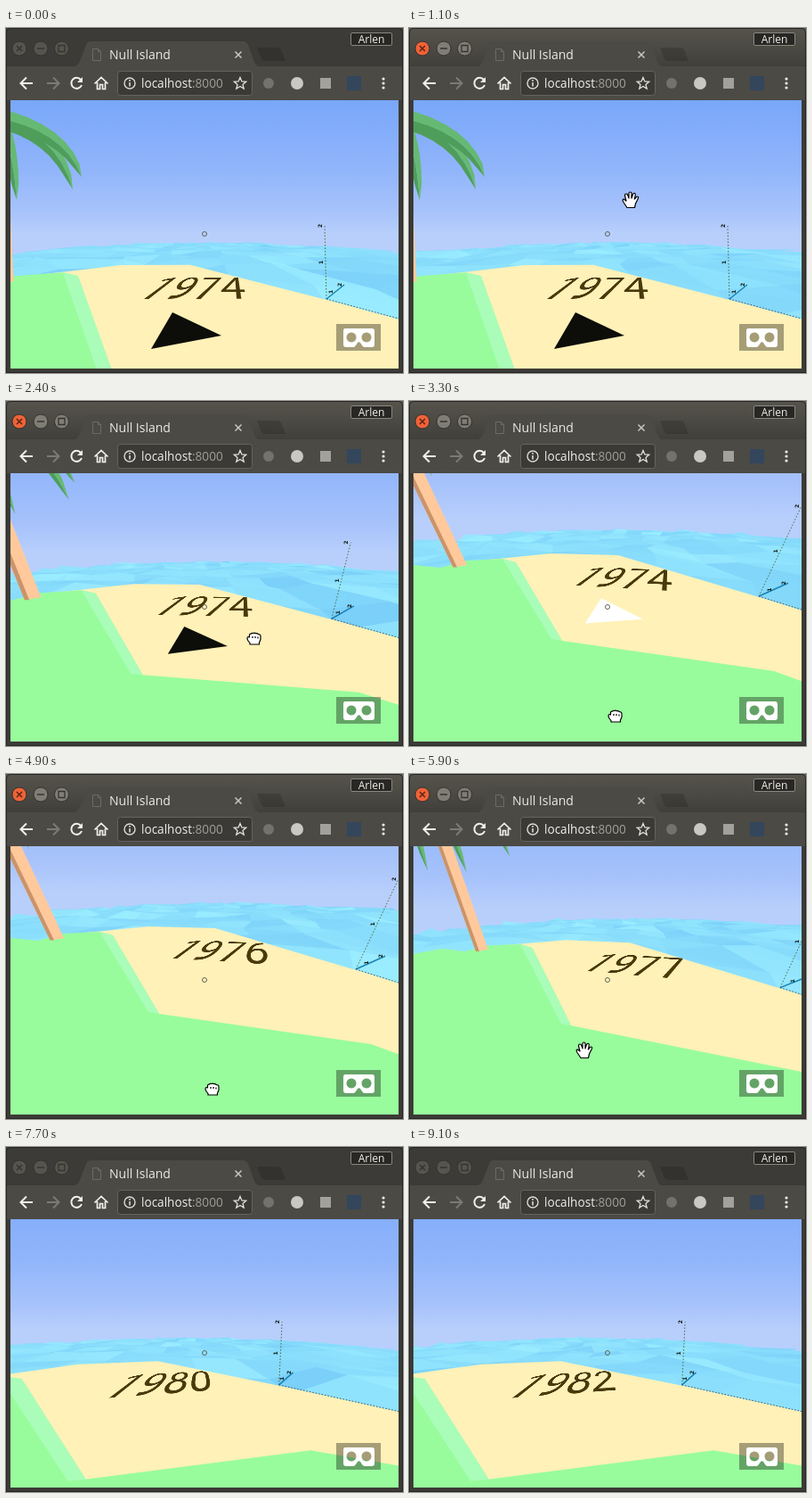
An HTML page with a canvas that plays this animation: 446 by 387 pixels, repeating every 9200 ms.

```html
<!DOCTYPE html>
<html lang="en">
<head>
<meta charset="utf-8">
<title>Null Island</title>
<style>
html, body { margin: 0; width: 100%; height: 100%; overflow: hidden; background: #2b2a27; }
#win { position: relative; width: 446px; height: 387px; overflow: hidden; background: #3c3b37; font-family: "Open Sans", "Noto Sans", sans-serif; }
#bar { position: absolute; inset: 0 0 auto; height: 44px; background: #3c3b37; }
.on #bar { background: linear-gradient(#56544c, #403f3a); }
#chrome, #hand { position: absolute; left: 0; top: 0; }
#chrome text { font-size: 14px; }
.btn { fill: #56544e; stroke: #34332f; }
.glyph { fill: none; stroke: #35342f; }
.on .btn { fill: #807d75; }
.on .close { fill: #ee6238; }
.on .close + .glyph { stroke: #5f2410; }
#scene { position: absolute; left: 5px; top: 81px; width: 436px; height: 301px; overflow: hidden; }
canvas { display: block; }
#year { position: absolute; left: 0; top: 0; font: 400 100px/1 Roboto, sans-serif; color: #4a390b; transform-origin: 0 0; white-space: nowrap; }
#ring { position: absolute; left: 215px; top: 147px; width: 4px; height: 4px; border: 1px solid #62645c; border-radius: 50%; }
#vr { position: absolute; left: 366px; top: 251px; width: 50px; height: 30px; background: rgba(0, 0, 0, .35); }
#frame { position: absolute; inset: 0; border: 1px solid #262522; border-radius: 5px 5px 0 0; }
</style>
</head>
<body>
<div id="win">
  <div id="bar"></div>
  <svg id="chrome" width="446" height="387">
    <circle class="btn close" cx="15" cy="23" r="8"/>
    <path class="glyph" stroke-width="1.5" d="M12 20l6 6m0-6l-6 6"/>
    <circle class="btn" cx="39" cy="23" r="8"/>
    <path class="glyph" stroke-width="1.5" d="M35 23h8"/>
    <circle class="btn" cx="62.5" cy="23" r="8"/>
    <path class="glyph" stroke-width="1.3" d="M59 19.5h7v7h-7z"/>
    <rect y="43" width="446" height="38" fill="#4b4a45"/>
    <path d="M76 44Q81 42 83 37L90 19Q91 15 96 15H266Q270 15 272 19L279 38Q281 43 286 44Z" fill="#4b4a45"/>
    <path d="M282 22H305Q308 22 309 24L314 37H291Q288 37 287 35Z" fill="#000" fill-opacity=".14"/>
    <path d="M97.5 23.5h6l3 3v10h-9zM103.5 23.5v3h3" fill="none" stroke="#6d6b65"/>
    <text x="116" y="35" fill="#ecebe6">Null Island</text>
    <path d="M257.5 26.5l7 7m0-7l-7 7" stroke="#c9c7c1" stroke-width="1.5"/>
    <rect x="387.5" y="5.5" width="46" height="14" rx="1.5" fill="#282724" stroke="#8a8881"/>
    <text x="410.5" y="17" text-anchor="middle" fill="#eeede8" style="font-size:12px">Arlen</text>
    <g fill="none" stroke="#f1f0ec" stroke-width="2">
      <path d="M30 62H17m6-6.5L16.5 62l6.5 6.5"/>
      <path d="M46 62h13m-6-6.5l6.5 6.5-6.5 6.5" stroke="#7c7a74"/>
      <path d="M84 58a6 6 0 1 0 1 6"/><path d="M86 55v6h-6z" fill="#f1f0ec" stroke="none"/>
      <path d="M99.5 62.5L107 55.5l7.5 7M102.500 61v7.5h3v-5h3v5h3V61" stroke-width="1.7"/>
    </g>
    <rect x="125.5" y="48.5" width="151" height="27" rx="3" fill="#3b3a36" stroke="#65635d"/>
    <circle cx="139" cy="62" r="6" fill="none" stroke="#dddbd6" stroke-width="1.4"/>
    <path d="M139 58v1.7M139 61v4.5" stroke="#dddbd6" stroke-width="1.6"/>
    <text x="152" y="67" fill="#f1f0ec" style="font-size:13.6px">localhost<tspan fill="#a19f98">:8000</tspan></text>
    <path d="M263 55.5l1.9 4.4 4.8.4-3.7 3.1 1.2 4.7-4.2-2.6-4.2 2.6 1.2-4.7-3.7-3.1 4.8-.4z" fill="none" stroke="#e3e1dc" stroke-width="1.3"/>
    <circle cx="295" cy="62" r="6" fill="#74726c"/>
    <circle cx="327" cy="62" r="7" fill="#c9c8c4"/>
    <rect x="353" y="56" width="12" height="12" fill="#a3a19c"/>
    <rect x="383" y="54" width="16" height="16" fill="#33465c"/>
    <g fill="#f1f0ec"><circle cx="424" cy="57" r="1.6"/><circle cx="424" cy="62" r="1.6"/><circle cx="424" cy="67" r="1.6"/></g>
  </svg>
  <div id="scene">
    <canvas width="436" height="301"></canvas>
    <div id="year">1974</div>
    <div id="ring"></div>
    <svg id="vr" viewBox="0 0 50 30">
      <path fill="#fff" fill-rule="evenodd" d="M10 5H40Q43 5 43 8V23Q43 26 40 26H32Q30 26 29 24L27 21Q25.500 19.500 24 21L22 24Q21 26 19 26H11Q8 26 8 23V8Q8 5 10 5ZM17 9.500a5.500 5.500 0 1 0 .01 0ZM34 9.500a5.500 5.500 0 1 0 .01 0Z"/>
    </svg>
  </div>
  <div id="frame"></div>
  <svg id="hand" width="20" height="20" fill="#fff" stroke="#000" stroke-width="1.2" stroke-linejoin="round">
    <path id="open" d="M6 18.5L2 12.5Q0 9 2.5 9L5 11 3.5 5Q3.5 3 5 3 6.5 3 7 5L8 8V2.5Q8 1 9.5 1 11 1 11 2.5V8L12.5 3.5Q13 2 14.3 2.3 15.6 2.7 15.3 4.3L14.3 9 16.5 6.5Q17.7 5.5 18.5 6.5 19 7.2 18 9L15.5 14 14.5 18.5Z"/>
    <path id="closed" d="M5 16V14.5L3 12Q1 8 3 7.5L4.5 8V5.5Q4.5 4 6.3 4.2 7.2 3 8.7 3.5 10.2 2.6 11.6 3.7 13.3 3.2 14.3 4.6 17 4.5 17 7V10.5L15.5 14V16ZM8 7v2m3-2v2m3-1.5v2"/>
  </svg>
</div>
<script>
const $ = id => document.getElementById(id);
const ctx = document.querySelector('canvas').getContext('2d');
const LOOP = 9200, CX = 223, CY = 231.5, F = 150.5 / Math.tan(Math.PI * 2 / 9);
const mix = (a, b, u) => a.map((n, i) => n + (b[i] - n) * u);
const ease = (t, from, to) => {
  const u = Math.max(0, Math.min(1, (t - from) / (to - from)));
  return u * u * (3 - 2 * u);
};

// Each drag turns the camera by GAIN radians per pixel; between drags the hand glides to the next grip.
const GAIN = .002, GLIDE = 200, HOME = [241, 200];
const DRAGS = [
  { t: [1200, 1800], from: [257, 186], to: [230, 346] },
  { t: [2300, 3000], from: [282, 262], to: [232, 354] },
  { t: [5200, 5900], from: [220, 347], to: [183, 306] },
  { t: [6000, 6600], from: [211, 313], to: [401, 180] },
  { t: [6600, 6900], from: [401, 180], to: [425, 176] }
];

function poseAt(t) {
  let hand = HOME, yaw = 0, pitch = 0, grab = false;
  for (const { t: [a, b], from, to } of DRAGS) {
    if (t >= a) {
      const u = ease(t, a, b);
      yaw += GAIN * (to[0] - from[0]) * u;
      pitch -= GAIN * (to[1] - from[1]) * u;
      hand = mix(from, to, u);
      grab = t < 7000;
    } else if (t > a - GLIDE) {
      hand = mix(hand, from, ease(t, a - GLIDE, a));
      grab = false;
      break;
    }
  }
  return { hand, grab, yaw, pitch };
}

function makeView(yaw, pitch) {
  return { cy: Math.cos(yaw), sy: Math.sin(yaw), cp: Math.cos(pitch), sp: Math.sin(pitch), pitch };
}
function toWorld(v, x, y) {
  const a = (x - CX) / F, b = (CY - y) / F, z = v.cp - b * v.sp;
  return [a * v.cy + z * v.sy, b * v.cp + v.sp, z * v.cy - a * v.sy];
}
function toCam(v, [X, Y, Z]) {
  const z = X * v.sy + Z * v.cy;
  return [X * v.cy - Z * v.sy, Y * v.cp - z * v.sp, Y * v.sp + z * v.cp];
}
const toScreen = ([x, y, z]) => [CX + F * x / z, CY - F * y / z];

// Shapes are written as screen points seen at a given time.
const viewAt = t => { const p = poseAt(t); return makeView(p.yaw, p.pitch); };
const AHEAD = viewAt(0), DOWN = viewAt(3000), LEFT = viewAt(5900);
const shape = (v, color, coords) =>
  ({ color, pts: coords.split(' ').map(p => toWorld(v, ...p.split(',').map(Number))) });

// A drooping leaf: a tapered curve from the crown to its tip, light above and dark below.
function frond(tx, ty) {
  const rx = -15, ry = 100, ex = rx + (tx - rx) * .8, ey = ry + (ty - ry) * .2;
  const rib = [], up = [], low = [];
  for (let i = 0; i <= 8; i++) {
    const u = i / 8, w = 11 * Math.sqrt(1 - u);
    const at = (a, b, c) => a * (1 - u) ** 2 + 2 * b * u * (1 - u) + c * u * u;
    const dx = (ex - rx) * (1 - u) + (tx - ex) * u, dy = (ey - ry) * (1 - u) + (ty - ey) * u;
    const x = at(rx, ex, tx), y = at(ry, ey, ty), len = Math.hypot(dx, dy);
    rib.push([x, y]);
    up.push([x + w * dy / len, y - w * dx / len]);
    low.unshift([x - w * dy / len, y + w * dx / len]);
  }
  const half = (color, pts) => ({ color, pts: pts.map(p => toWorld(AHEAD, ...p)) });
  return [half('#4f9d5a', [...rib, ...low]), half('#66b973', [...up, ...rib.reverse()])];
}

const LAND = [
  shape(DOWN, '#fff1b7', '60,181 160,171 235,173 400,222 900,379 900,900 60,900'),
  shape(DOWN, '#98fc9c', '-600,300 5,184 35,187 65,179 105,177 120,181 172,269 410,303 900,480 900,900 -600,900'),
  shape(DOWN, '#a9fdb9', '105,177 120,181 172,269 160,267'),
  shape(LEFT, '#ffc99c', '18,40 34,40 89,197 75,199'),
  shape(LEFT, '#c9946b', '18,40 22,40 79,199 75,199'),
  ...[[-47, 189], [12, 193], [75, 181], [85, 167]].flatMap(p => frond(...p))
];
const ARROW = shape(AHEAD, '', '187,319 242,345 163,360').pts;
const AXES = [
  { ...shape(AHEAD, '#4a6a42', '360,304 358,222'), dash: [1.5, 2] },
  { ...shape(AHEAD, '#1b82b2', '360,304 380,288'), dash: [] },
  { ...shape(AHEAD, '#4c5350', '360,304 600,369'), dash: [1.5, 2] }
];

// Ground plane of the year: foot of the first digit, reading direction, upward direction
const TEXT = { o: [-.91, -1, 2.475], u: [1.55, 0, 0], v: [.21, 0, 1.225] };

let seed = 11;
const rand = () => (seed = seed * 16807 % 2147483647) / 2147483647;
const SIDE = 18, STEP = 2.1, RADIUS = 17, MID = 13;
const sea = [], facets = [];
const spot = i => (i - (SIDE - 1) / 2 + (rand() - .5) * .6) * STEP;
for (let j = 0; j < SIDE; j++) for (let i = 0; i < SIDE; i++) sea.push({
  x: spot(i), z: MID + spot(j),
  phase: rand() * 6.28, amp: .08 + rand() * .17, speed: .9 + rand()
});
for (let j = 0; j < SIDE - 1; j++) for (let i = 0; i < SIDE - 1; i++) {
  const a = j * SIDE + i, b = a + 1, c = a + SIDE, d = c + 1;
  for (const ids of [[a, b, c], [b, d, c]]) {
    const x = ids.reduce((s, k) => s + sea[k].x, 0) / 3, z = ids.reduce((s, k) => s + sea[k].z, 0) / 3;
    if (Math.hypot(x, z - MID) < RADIUS) facets.push({ ids, far: Math.hypot(x, z) });
  }
}
facets.sort((a, b) => b.far - a.far);

function clip(pts) {
  const near = .05, out = [];
  pts.forEach((p, i) => {
    const q = pts[(i + 1) % pts.length];
    if (p[2] > near) out.push(p);
    if ((p[2] > near) !== (q[2] > near)) out.push(mix(p, q, (near - p[2]) / (q[2] - p[2])));
  });
  return out;
}
function fill(v, pts, color, seam) {
  const cam = clip(pts.map(p => toCam(v, p)));
  if (cam.length < 3) return;
  ctx.beginPath();
  cam.forEach(p => ctx.lineTo(...toScreen(p)));
  ctx.closePath();
  ctx.fillStyle = ctx.strokeStyle = color;
  ctx.fill();
  if (seam) { ctx.lineWidth = .7; ctx.stroke(); }
}

function drawSky(v) {
  const yAt = el => CY - F * Math.tan(el * Math.PI / 180 - v.pitch);
  const top = yAt(44), end = yAt(0), g = ctx.createLinearGradient(0, top, 0, end);
  [[44, '#72a3f9'], [22, '#91b5fb'], [9, '#a6c2fb'], [0, '#b8cffc']]
    .forEach(([el, c]) => g.addColorStop((yAt(el) - top) / (end - top), c));
  ctx.fillStyle = g;
  ctx.fillRect(0, 0, 446, 387);
}

function drawSea(v, t) {
  const pts = sea.map(p => [p.x, -1.66 + p.amp * Math.sin(p.phase + p.speed * t / 1000), p.z]);
  for (const { ids } of facets) {
    const [a, b, c] = ids.map(i => pts[i]);
    const p = b.map((n, i) => n - a[i]), q = c.map((n, i) => n - a[i]);
    const n = [q[1] * p[2] - q[2] * p[1], q[2] * p[0] - q[0] * p[2], q[0] * p[1] - q[1] * p[0]];
    const s = Math.max(0, Math.min(1, .5 + 2.5 * (n[0] - n[2]) / Math.hypot(...n)));
    fill(v, [a, b, c], `rgb(${122 + 32 * s},${208 + 28 * s},${249 + 6 * s})`, true);
  }
}

function drawAxes(v) {
  ctx.fillStyle = '#10150f';
  ctx.font = 'bold 6px "DejaVu Sans", sans-serif';
  ctx.textAlign = 'center';
  AXES.forEach(({ pts, color, dash }, i) => {
    const [a, b] = pts.map(p => toScreen(toCam(v, p)));
    ctx.strokeStyle = color;
    ctx.lineWidth = i === 1 ? 1.5 : 1;
    ctx.setLineDash(dash);
    ctx.beginPath();
    ctx.moveTo(...a);
    ctx.lineTo(...b);
    ctx.stroke();
    if (i < 2) for (const k of [1, 2]) {
      const [x, y] = mix(a, b, k / 2);
      ctx.save();
      ctx.translate(x - 5, y);
      ctx.rotate(-Math.PI / 2);
      ctx.fillText(k, 0, 2);
      ctx.restore();
    }
  });
  ctx.setLineDash([]);
}

function placeYear(v) {
  const W = 191, H = 71, BASE = 84, INSET = 30;
  const col = ([x, y, z]) => [F * x + (CX - 5) * z, (CY - 81) * z - F * y, 0, z];
  const u = TEXT.u.map(n => n / W), d = TEXT.v.map(n => -n / H);
  const o = TEXT.o.map((n, i) => n - u[i] * INSET - d[i] * BASE);
  const m = [...col(toCam(v, u)), ...col(toCam(v, d)), 0, 0, 1, 0, ...col(toCam(v, o))];
  $('year').style.transform = `matrix3d(${m.map((n, i) => i === 10 ? 1 : (n / m[15]).toFixed(8))})`;
}

function draw(t) {
  const { hand, grab, yaw, pitch } = poseAt(t), v = makeView(yaw, pitch);
  ctx.setTransform(1, 0, 0, 1, -5, -81);
  drawSky(v);
  drawSea(v, t);
  LAND.forEach(s => fill(v, s.pts, s.color));
  drawAxes(v);
  if (t < 3500) fill(v, ARROW, t < 2800 ? '#0d0d0a' : '#fff');
  $('year').textContent = 1974 + Math.max(0, Math.floor((t - 3600) / 650));
  placeYear(v);

  $('win').className = t >= 900 && t < 7700 ? 'on' : '';
  $('hand').style.visibility = t >= 800 && t < 7400 ? 'visible' : 'hidden';
  $('hand').style.transform = `translate(${hand.map(n => Math.round(n) - 10 + 'px')})`;
  $('open').style.display = grab ? 'none' : '';
  $('closed').style.display = grab ? '' : 'none';
}

const start = performance.now();
function tick() {
  const t = (performance.now() - start) % LOOP;
  draw(Math.floor(t / 100) * 100);
  requestAnimationFrame(tick);
}
tick();
</script>
</body>
</html>
```
